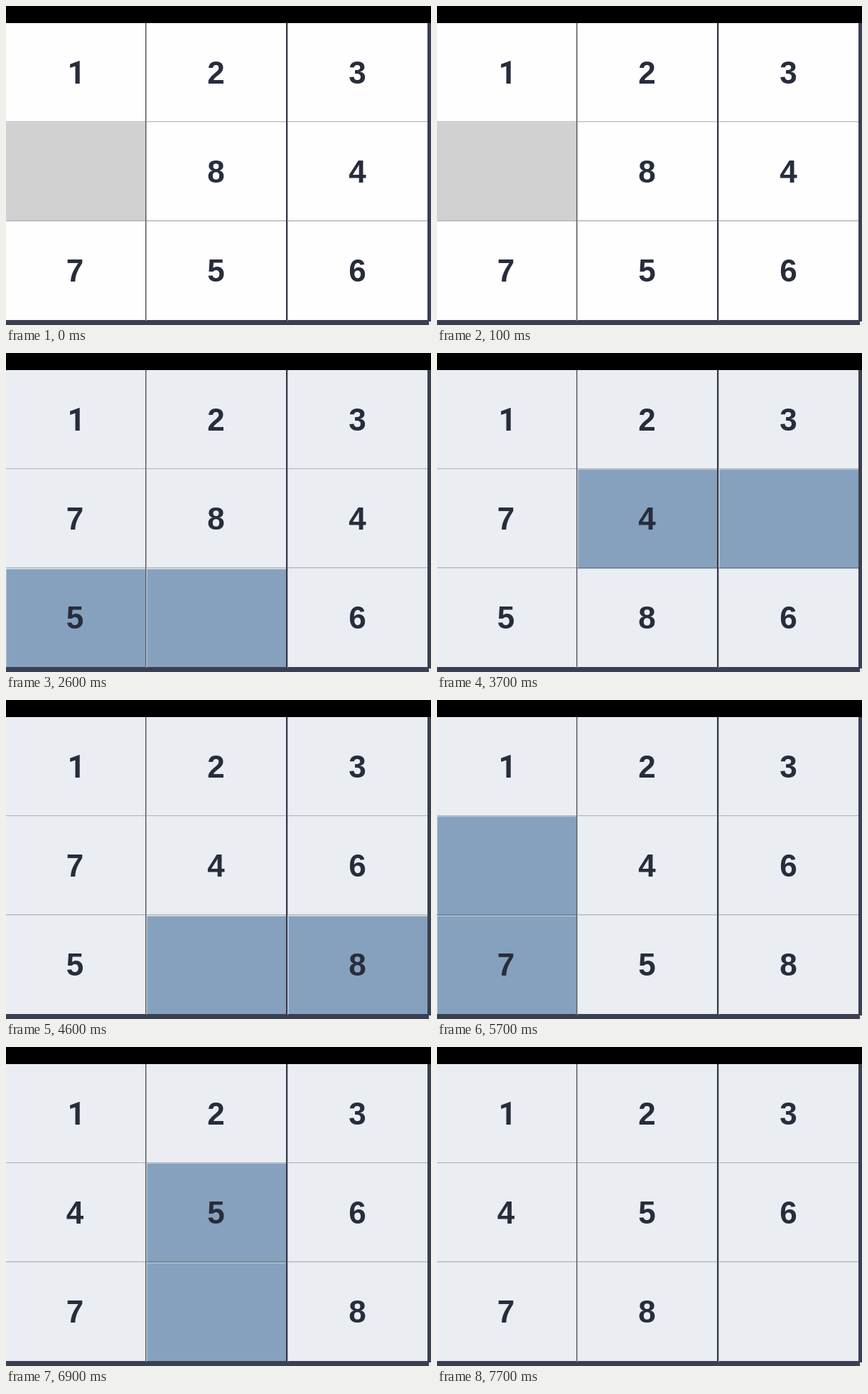
An HTML page with a canvas for the animation above (8100 ms loop, 598 by 448 pixels).

```html
<!DOCTYPE html>
<html lang="en">
<head>
<meta charset="utf-8">
<title>Sliding puzzle</title>
<style>
html, body { margin: 0; width: 100%; height: 100%; overflow: hidden; background: #000; }
canvas { display: block; }
</style>
</head>
<body>
<canvas id="board" width="598" height="448"></canvas>
<script>
const ctx = document.getElementById('board').getContext('2d');
const LOOP = 8100;
const LEFT = [0, 198, 397], RIGHT = [196, 394, 593];
const TOP = [24, 163.5, 303], BOTTOM = [162, 301.5, 441];
const CENTER = [97, 295.5, 494.5], BASELINE = [109, 248, 387];
const INK = '#282d3c', FRAME = '#3a4052';
const PALE = '#eaedf2', BLUE = '#85a1be', GREEN = '#a4c28e';
const SEARCH_END = 1500, SOLVED = 7700;
const START = [1, 2, 3, 0, 8, 4, 7, 5, 6];

// [time, cell whose tile slides into the gap]
const MOVES = [
  [2100, 6], [2600, 7], [3100, 4], [3600, 5], [4100, 8], [4600, 7],
  [5100, 6], [5700, 3], [6200, 4], [6700, 7], [7200, 8]
];

function rect(x, y, w, h, color) {
  ctx.fillStyle = color;
  ctx.fillRect(x, y, w, h);
}

function stateAt(time) {
  const tiles = START.slice();
  let gap = tiles.indexOf(0), active = [];
  for (const [when, cell] of MOVES) {
    if (time < when) break;
    tiles[gap] = tiles[cell];
    tiles[cell] = 0;
    active = [gap, cell];
    gap = cell;
  }
  if (time >= SOLVED) active = [];
  return { tiles, gap, active };
}

function cellColor(cell, time, state) {
  if (time < SEARCH_END) return cell === state.gap ? '#d1d1d1' : '#fefefe';
  if (time < MOVES[0][0] && cell === state.gap) return GREEN;
  return state.active.includes(cell) ? BLUE : PALE;
}

function drawDigit(digit, col, row) {
  const plainOne = digit === 1;
  ctx.font = plainOne
    ? 'bold 44px Roboto, sans-serif'
    : 'bold 44px "Liberation Sans", Arial, sans-serif';
  ctx.fillStyle = INK;
  ctx.fillText(digit, CENTER[col] + (plainOne ? 2 : 0), BASELINE[row]);
}

function drawCell(cell, time, state) {
  const col = cell % 3, row = Math.floor(cell / 3);
  const x = LEFT[col], y = Math.floor(TOP[row]);
  const w = RIGHT[col] - x, h = Math.floor(BOTTOM[row]) - y;
  const color = cellColor(cell, time, state);
  rect(x, y, w, h, color);
  if (color !== PALE && row) rect(x, y, w, 1, 'rgba(255,255,255,.4)');
  if (color === BLUE) rect(x, y, 1, h, 'rgba(255,255,255,.35)');
  if (row < 2) {
    const tinted = color === BLUE || color === GREEN;
    rect(x, y + h, w, 1, tinted ? '#687f8c' : '#adafb4');
    rect(x, y + h + 1, w, 1, tinted ? color : '#dfe1e5');
  }
  if (state.tiles[cell]) drawDigit(state.tiles[cell], col, row);
}

function draw(time) {
  const state = stateAt(time);
  rect(0, 0, 598, 448, FRAME);
  rect(0, 0, 598, 24, '#000');
  for (let cell = 0; cell < 9; cell++) drawCell(cell, time, state);
  rect(196, 24, 2, 418, '#5a5d66');
  rect(197, 24, 1, 418, '#a3a5ab');
  rect(394, 24, 2, 418, '#353946');
  rect(396, 24, 1, 418, '#b8bbc2');
  rect(595, 443, 3, 5, '#e4e6ea');
}

ctx.textAlign = 'center';
const startTime = performance.now();
function tick() {
  draw((performance.now() - startTime) % LOOP);
  requestAnimationFrame(tick);
}
tick();
</script>
</body>
</html>
```
